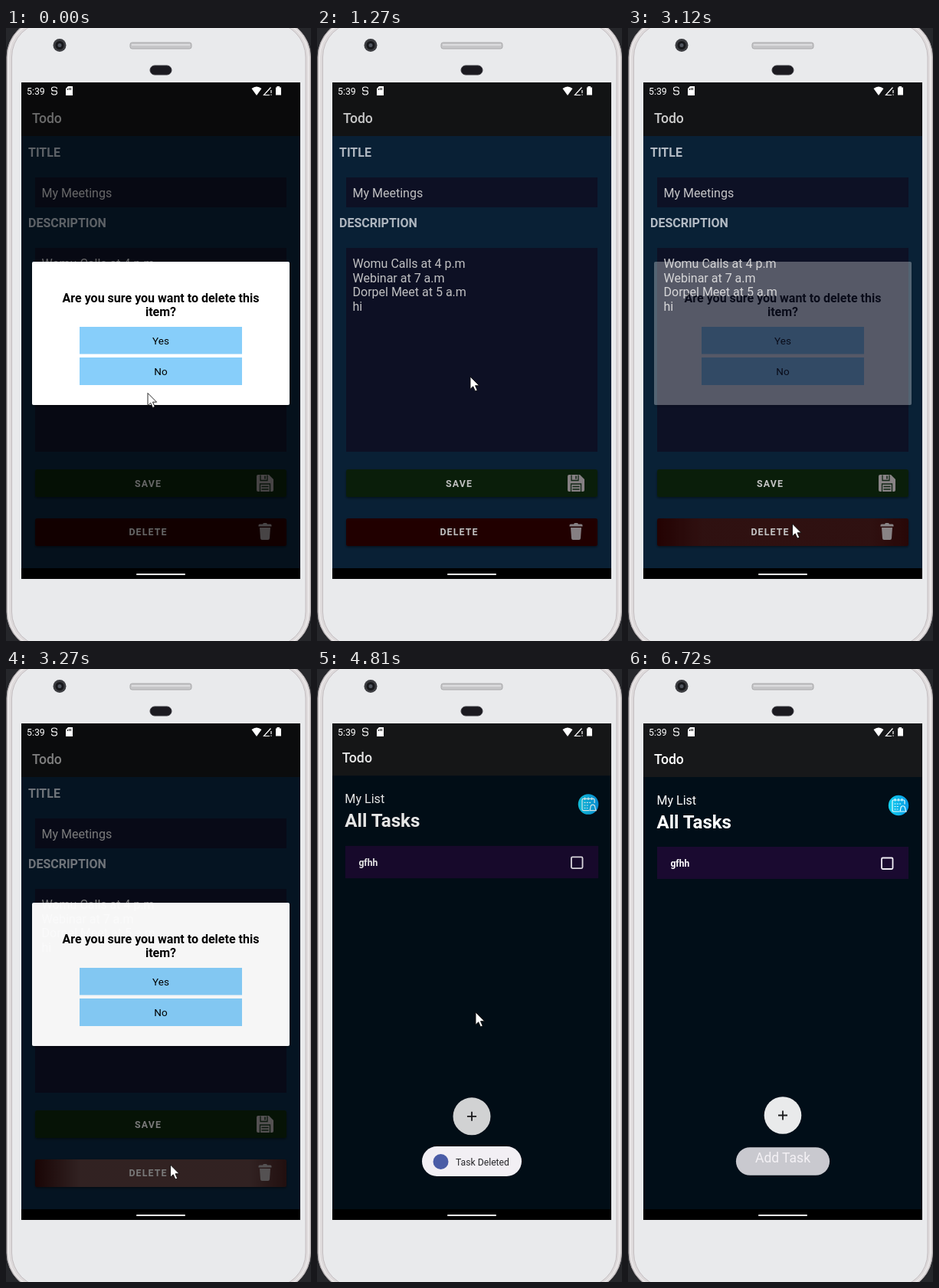
An HTML page for the animation above (6.82 s loop, 398 by 800 pixels).

```html
<!DOCTYPE html>
<html lang="en">
<head>
<meta charset="utf-8">
<title>Todo app</title>
<style>
  html, body { margin: 0; width: 100%; height: 100%; overflow: hidden; background: #26272b; }
  svg { display: block; width: 398px; height: 800px; font-family: Roboto, sans-serif; }
  text { white-space: pre; }
  .t { font-size: 16px; }
  .b { font-weight: 700; }
  .m { font-weight: 500; }
  .mid { text-anchor: middle; }
  .btn { font-size: 12.4px; font-weight: 700; letter-spacing: 1.1px; text-anchor: middle; }
</style>
</head>
<body>
<svg viewBox="0 0 398 800">
  <defs>
    <clipPath id="screen"><rect x="20" y="71" width="364" height="648"/></clipPath>
    <linearGradient id="rippleFill">
      <stop offset="0" stop-color="#fff" stop-opacity=".04"/>
      <stop offset=".18" stop-color="#fff" stop-opacity=".27"/>
      <stop offset=".85" stop-color="#fff" stop-opacity=".27"/>
      <stop offset="1" stop-color="#fff" stop-opacity=".12"/>
    </linearGradient>
    <linearGradient id="cyan">
      <stop offset="0" stop-color="#12d0ee"/><stop offset="1" stop-color="#0899e6"/>
    </linearGradient>
    <filter id="soft" x="-10%" y="-30%" width="120%" height="170%">
      <feDropShadow dx="0" dy="1.5" stdDeviation="1.5" flood-opacity=".45"/>
    </filter>
  </defs>

  <!-- phone body -->
  <rect x="1" y="-12" width="396.5" height="824" rx="50" fill="#dedadb" stroke="#a8a2a5"/>
  <rect x="3.5" y="-10" width="391" height="820" rx="48" fill="none" stroke="#f3f0f1"/>
  <rect x="7.5" y="-7" width="383.5" height="814" rx="45" fill="#e9eaec" stroke="#c3bdc0"/>
  <circle cx="70" cy="22.5" r="8.5" fill="#3b3c40"/>
  <circle cx="70" cy="22.5" r="5.5" fill="#17181b"/>
  <circle cx="70" cy="22.5" r="2.5" fill="#50555e"/>
  <rect x="162" y="19" width="80" height="8" rx="2.5" fill="#c6c6c8" stroke="#a7a7a9"/>
  <path d="M164 22H240" stroke="#dcdcde" stroke-width="2"/>
  <rect x="188" y="49" width="28" height="12" rx="6" fill="#1b1a20" stroke="#37363c"/>

  <g clip-path="url(#screen)">
    <!-- edit screen -->
    <g id="edit">
      <rect x="20" y="71" width="364" height="648" fill="#0b2944"/>
      <rect x="20" y="71" width="364" height="70" fill="#17181a"/>
      <text class="m" x="34" y="124" font-size="17.6" fill="#fff">Todo</text>
      <text class="t b" x="29" y="168" fill="#dfe9f5">TITLE</text>
      <text class="t b" x="29" y="260" fill="#dfe9f5">DESCRIPTION</text>
      <g fill="#10152e">
        <rect x="38" y="195" width="328" height="39"/>
        <rect x="38" y="287" width="328" height="266"/>
      </g>
      <g class="t" fill="#f6f6f8">
        <text x="46.5" y="221">My Meetings</text>
        <text x="46.5" y="313">Womu Calls at 4 p.m</text>
        <text x="46.5" y="331.5">Webinar at 7 a.m</text>
        <text x="46.5" y="350">Dorpel Meet at 5 a.m</text>
        <text x="46.5" y="368.5">hi</text>
      </g>
      <rect x="38" y="576" width="328" height="36" rx="2.5" fill="#0f260f" filter="url(#soft)"/>
      <rect x="38" y="640" width="328" height="36" rx="2.5" fill="#2b0504" filter="url(#soft)"/>
      <rect id="ripple" x="38" y="640" width="328" height="36" rx="2.5" fill="url(#rippleFill)"/>
      <g class="btn" fill="#f4f4f4">
        <text x="185.5" y="598.5">SAVE</text>
        <text x="185.5" y="662">DELETE</text>
      </g>
      <!-- floppy and bin -->
      <g fill="#aaa3a6">
        <path d="M329 583h14l6 6v14q0 2-2 2h-18q-2 0-2-2v-18q0-2 2-2z"/>
        <path d="M329.5 649q0-1.5 1.5-1.5h4l1-1.5h4l1 1.5h4q1.5 0 1.5 1.5v1.5h-17zM331 652h14l-1 14q-.2 2-2 2h-8q-1.8 0-2-2z"/>
      </g>
      <path d="M332 583.5v7h9v-7M331.5 605v-10h13v10" fill="none" stroke="#14301a" stroke-width="1.3"/>
      <path d="M338 584.5v4M333.5 598.5h9M333.5 602h9" stroke="#14301a" stroke-width="1.5"/>
    </g>
    <rect id="dim" x="20" y="71" width="364" height="648"/>

    <!-- confirmation -->
    <g id="dialog">
      <rect x="34" y="305" width="336" height="187" rx="2" fill="#fff" filter="url(#soft)"/>
      <g class="mid t b">
        <text x="202" y="357.5">Are you sure you want to delete this</text>
        <text x="202" y="376">item?</text>
      </g>
      <g fill="#87cefa">
        <rect x="96" y="390" width="212" height="35.5"/>
        <rect x="96" y="430" width="212" height="36"/>
      </g>
      <g class="mid" font-size="13.5">
        <text x="202" y="413">Yes</text>
        <text x="202" y="453">No</text>
      </g>
    </g>

    <!-- task list -->
    <g id="list">
      <rect x="20" y="71" width="364" height="648" fill="#010e18"/>
      <rect x="20" y="71" width="364" height="70" fill="#17181a"/>
      <g fill="#fff">
        <text class="m" x="34" y="124" font-size="17.6">Todo</text>
        <text class="t" x="37.5" y="177">My List</text>
        <text class="b" x="37.5" y="207.5" font-size="24">All Tasks</text>
      </g>
      <circle cx="353" cy="178" r="13.2" fill="url(#cyan)"/>
      <g fill="none" stroke="#e8fbff" stroke-width="1.2">
        <path d="M354 186h-7.5q-1.5 0-1.5-1.5v-12q0-1.5 1.5-1.5h13q1.5 0 1.5 1.5v4M348.5 169v3.5M353 169v3.5M357.5 169v3.5"/>
        <path d="M347.5 176h9M347.5 179.5h6M347.5 183h5" stroke-dasharray="2 1.3"/>
        <path d="M355 186q.5-2 1-5a2.8 2.8 0 0 1 5.5 0q.5 3 1.5 5z"/>
      </g>
      <rect x="38" y="232" width="328" height="42" fill="#1a0a30"/>
      <text class="b" x="55.5" y="258" font-size="12" fill="#fff">gfhh</text>
      <rect x="331" y="246.5" width="14.5" height="14.5" rx="1.5" fill="none" stroke="#f0edf4" stroke-width="1.8"/>
      <circle cx="202" cy="582.5" r="24.3" fill="#e9eaeb"/>
      <path d="M196 582.5h12M202 576.5v12" stroke="#1c1c1e" stroke-width="1.8"/>
      <text class="mid" x="202" y="644" font-size="17.5" fill="#fff">Add Task</text>
      <rect id="shade" x="20" y="71" width="364" height="648"/>
    </g>

    <g id="toast">
      <rect x="137" y="623" width="130" height="39" rx="19.5" fill="#f2eff4"/>
      <g id="toastLabel">
        <circle cx="161.5" cy="643" r="10" fill="#4a5ca6"/>
        <text x="181" y="648" font-size="12.2" fill="#28282b">Task Deleted</text>
      </g>
    </g>

    <!-- system bars -->
    <rect x="20" y="705" width="364" height="14"/>
    <path d="M171 713H233" stroke="#fff" stroke-width="2" stroke-linecap="round"/>
    <g fill="#fff">
      <text x="27" y="86.7" font-size="12.3">5:39</text>
      <path d="M81 76h6v12h-9v-9zM320.5 79q6.5-5 13 0l-6.5 9zM353.5 77.5v-1.5h3.5v1.5h2v10h-7v-10z"/>
      <path d="M80.5 79v2M82.5 78v3M84.5 78v3" stroke="#151515"/>
      <g fill="none" stroke="#fff" stroke-width="1.2">
        <path d="M66.5 79.5q0-2.5-3.5-2.5t-3.5 2.5t3.5 2.5t3.5 2.5t-3.5 2.5t-3.5-2.5M59.5 82h7"/>
        <path d="M344 87.5h-7.5l9-10M346 81v4M346 86.5v1.2"/>
      </g>
    </g>
  </g>

  <path id="cursor" d="M0 0V16.3L3.7 12.8L6.5 19L9.2 17.8L6.5 11.7H11.6Z" fill="#fff" stroke="#111" stroke-width=".9"/>
</svg>
<script>
  const LOOP = 6820;
  const el = id => document.getElementById(id);
  const steps = (from, to, n) => Array.from({ length: n }, (_, i) => from + (to - from) * i / (n - 1));

  // The screen refreshes only at these moments.
  const ticks = [0, ...steps(120, 1150, 8), ...steps(1270, 2260, 8), 2380,
    3120, 3270, ...steps(3390, 4090, 6), 4210, 4360, 4510, 4660, 4810, 4930, 5080, 5200,
    ...steps(5320, 6280, 8), 6570, 6720];

  // Each key is [time, value, ...].
  const tracks = {
    cursor: [[0, 185, 476.5], [720, 200, 455], [1270, 200, 455], [2260, 214.5, 647], [3390, 214.5, 647],
      [4090, 205.5, 409], [4360, 205.5, 409], [4810, 207, 448], [5200, 237, 607], [6280, 273, 803]],
    dim: [[1020, .58], [1150, .5], [1270, .22], [1400, 0], [3000, 0], [3120, .2], [3270, .5],
      [3390, .58], [4360, .58], [4510, .45], [4660, .2], [4810, 0]],
    dialog: [[1020, 1], [1150, .5], [1270, 0], [3000, 0], [3120, .3], [3270, .965], [3390, 1],
      [4360, 1], [4510, .5], [4660, 0]],
    ripple: [[3000, 0], [3120, .3], [3270, 1], [3390, .3], [3530, 0]],
    list: [[4510, 0], [4660, .5], [4810, 1]],
    listScale: [[4660, 1.04], [4810, 1.007], [4930, 1]],
    shade: [[4810, .1], [4930, 0]],
    toast: [[4510, 0], [4660, .6], [4810, 1], [6280, 1], [6570, .95], [6720, .83]],
    toastScale: [[6280, 1], [6570, .98], [6720, .94]],
    toastLabel: [[6280, 1], [6570, .5], [6720, 0]]
  };

  function at(name, t) {
    const keys = tracks[name];
    const next = keys.findIndex(k => k[0] > t);
    if (next === 0) return keys[0].slice(1);
    if (next < 0) return keys[keys.length - 1].slice(1);
    const a = keys[next - 1], b = keys[next];
    const p = (t - a[0]) / (b[0] - a[0]);
    return a.slice(1).map((v, i) => v + (b[i + 1] - v) * p);
  }

  function scaleAbout(id, scale, x, y) {
    el(id).setAttribute('transform', `translate(${x} ${y}) scale(${scale}) translate(${-x} ${-y})`);
  }

  function draw(t) {
    for (const id of ['dim', 'dialog', 'ripple', 'list', 'shade', 'toast', 'toastLabel'])
      el(id).setAttribute('opacity', at(id, t)[0]);
    scaleAbout('list', at('listScale', t)[0], 202, 395);
    scaleAbout('toast', at('toastScale', t)[0], 202, 642.5);
    el('cursor').setAttribute('transform', `translate(${at('cursor', t)})`);
  }

  const start = performance.now();
  function frame() {
    const t = (performance.now() - start) % LOOP;
    draw(ticks.filter(tick => tick <= t).pop() ?? 0);
    requestAnimationFrame(frame);
  }
  frame();
</script>
</body>
</html>
```
